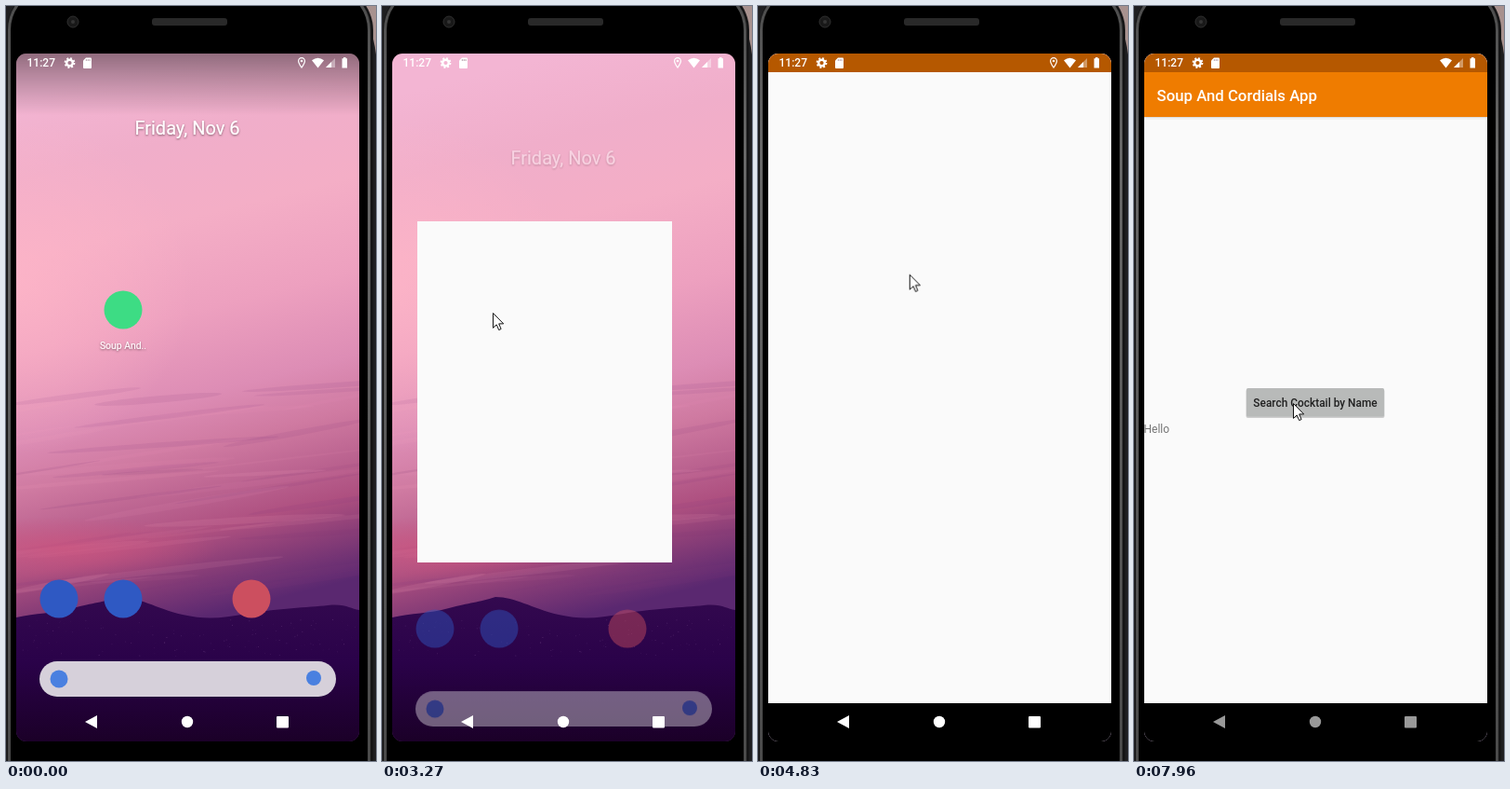
An HTML page that plays this animation: 398 px wide and 810 px high, repeating every 8 s.

```html
<!DOCTYPE html>
<html lang="en">
<head>
<meta charset="utf-8">
<title>Phone app launch</title>
<style>
html, body { margin: 0; width: 100%; height: 100%; overflow: hidden; background: #000; }
svg { position: absolute; left: 0; top: 0; display: block; }
#screen { position: absolute; left: 11px; top: 51px; width: 369px; height: 738px; border-radius: 11px; overflow: hidden; }
#screen > svg { left: -11px; top: -51px; }
text { font-family: Roboto, "Open Sans", sans-serif; }
.medium { font-weight: 500; }

.scrim, #home, #icon, #win, .bars, #app, .pin, #nav, #press, #cursor { animation: 8s linear infinite; }
.scrim { animation-name: scrim; }
#home { animation-name: home; }
#icon { animation-name: icon; transform-origin: 126px 326px; }
#win { position: absolute; background: #fafafa; animation-name: win; }
.bars { animation-name: bars; }
#app { animation-name: app; }
.pin { animation-name: pin; }
#nav { animation-name: nav; }
#press { animation-name: press; }
#cursor { animation-name: cursor; }

@keyframes scrim { 0%, 39% { opacity: 1; } 40.8%, 100% { opacity: 0; } }
@keyframes home {
  0%, 39% { opacity: 1; transform: none; }
  40.875% { opacity: .46; transform: translateY(32px); }
  42.5%, 100% { opacity: 0; transform: translateY(46px); }
}
@keyframes icon {
  0%, 32.25% { transform: scale(1); }
  35%, 39% { transform: scale(1.12); opacity: 1; }
  39.8%, 100% { transform: scale(1.12); opacity: 0; }
}
@keyframes win {
  0%, 39% { left: 95px; top: 255px; width: 40px; height: 40px; opacity: 0; }
  40% { left: 53px; top: 269px; width: 186px; height: 151px; opacity: 1; }
  40.875% { left: 27px; top: 181px; width: 273px; height: 364px; }
  41.875% { left: 9px; top: 72px; width: 337px; height: 592px; }
  43.75%, 100% { left: 0; top: 0; width: 369px; height: 738px; opacity: 1; }
}
@keyframes bars { 0%, 42.8% { opacity: 0; } 45%, 100% { opacity: 1; } }
@keyframes app { 0%, 63.8% { opacity: 0; } 66%, 100% { opacity: 1; } }
@keyframes pin { 0%, 63.8% { opacity: 1; } 66%, 100% { opacity: 0; } }
@keyframes nav { 0%, 61.25% { fill: #fff; } 66%, 100% { fill: #999; } }
@keyframes press { 0%, 97.2% { fill: #d6d7d6; } 99.5%, 100% { fill: #b8bab9; } }
@keyframes cursor {
  0%, 2.7% { transform: translate(360px, 815px); }
  2.875% { transform: translate(356px, 800px); animation-timing-function: ease-in-out; }
  12.75%, 13.125% { transform: translate(190px, 531px); animation-timing-function: ease-out; }
  17.625% { transform: translate(133px, 422px); animation-timing-function: ease-out; }
  23%, 23.625% { transform: translate(120px, 375px); animation-timing-function: ease-out; }
  30.375%, 53.375% { transform: translate(119px, 329px); animation-timing-function: ease-in-out; }
  63.25%, 69.5% { transform: translate(172px, 279px); animation-timing-function: ease-in-out; }
  79.375%, 80% { transform: translate(57.5px, 435.5px); animation-timing-function: ease-in-out; }
  85.125%, 100% { transform: translate(171px, 426px); }
}
</style>
</head>
<body>

<!-- phone body -->
<svg width="398" height="810">
  <defs>
    <linearGradient id="metal" x2="0" y2="1">
      <stop stop-color="#4a4a4a"/><stop offset=".2" stop-color="#686868"/>
      <stop offset="1" stop-color="#474747"/>
    </linearGradient>
  </defs>
  <rect width="398" height="810" fill="#1f1f21"/>
  <path d="M376 0H398V52Q394 18 376 0Z" fill="#a8928f"/>
  <rect x="1" y="-22" width="394" height="900" rx="48" fill="#161617"/>
  <rect x="3.5" y="-20" width="387" height="900" rx="46" fill="#000" stroke="url(#metal)" stroke-width="3"/>
  <rect x="157" y="13" width="81" height="8" rx="3" fill="#292929"/>
  <circle cx="72" cy="17" r="6" fill="#191919" stroke="#303030"/>
  <circle cx="72" cy="17" r="2" fill="#353535"/>
</svg>

<div id="screen">
  <!-- home screen -->
  <svg width="398" height="810">
    <defs>
      <linearGradient id="sky" gradientUnits="userSpaceOnUse" x1="195" y1="51" x2="338" y2="624">
        <stop stop-color="#f3b5d3"/>
        <stop offset=".146" stop-color="#f0aeca"/>
        <stop offset=".29" stop-color="#f4aec6"/>
        <stop offset=".458" stop-color="#eda0bf"/>
        <stop offset=".606" stop-color="#dd8db5"/>
        <stop offset=".7" stop-color="#cf7aa1"/>
        <stop offset=".787" stop-color="#ba628f"/>
        <stop offset=".85" stop-color="#ae5080"/>
        <stop offset=".91" stop-color="#8c3f78"/>
        <stop offset="1" stop-color="#5a2870"/>
      </linearGradient>
      <radialGradient id="glow">
        <stop stop-color="#ffb6c8" stop-opacity=".75"/><stop offset="1" stop-color="#ffb6c8" stop-opacity="0"/>
      </radialGradient>
      <radialGradient id="rose">
        <stop stop-color="#cc557f" stop-opacity=".8"/><stop offset="1" stop-color="#cc557f" stop-opacity="0"/>
      </radialGradient>
      <linearGradient id="hill" x2="0" y2="1">
        <stop stop-color="#33094f"/><stop offset=".45" stop-color="#2a0249"/><stop offset="1" stop-color="#1b0028"/>
      </linearGradient>
      <linearGradient id="shade" x2="0" y2="1">
        <stop stop-opacity=".4"/><stop offset=".35" stop-opacity=".25"/><stop offset="1" stop-opacity="0"/>
      </linearGradient>
      <filter id="drop" x="-20%" y="-50%" width="140%" height="220%">
        <feDropShadow dx="0" dy="1" stdDeviation="1.2" flood-opacity=".5"/>
      </filter>
    </defs>
    <rect x="11" y="51" width="369" height="738" fill="url(#sky)"/>
    <ellipse cx="11" cy="300" rx="190" ry="180" fill="url(#glow)"/>
    <g id="streaks"></g>
    <ellipse cx="60" cy="582" rx="170" ry="34" fill="url(#rose)"/>
    <path fill="url(#hill)" d="M11 656C32 651 50 652 72 646S104 640 122 634C144 634 160 646 190 653S240 655 265 651S325 645 346 643S370 647 380 648V789H11Z"/>
    <g id="specks" fill="#8b5c9c"></g>
    <rect class="scrim" x="11" y="51" width="369" height="66" fill="url(#shade)"/>

    <g id="home">
      <text x="195" y="138" font-size="20" text-anchor="middle" fill="#fff" filter="url(#drop)">Friday, Nov 6</text>
      <circle id="icon" cx="126" cy="326" r="20.5" fill="#3ddc84"/>
      <text x="126" y="368" font-size="10.4" text-anchor="middle" fill="#fff" filter="url(#drop)">Soup And..</text>
      <circle cx="57" cy="636" r="20.5" fill="#2f59c3"/>
      <circle cx="126" cy="636" r="20.5" fill="#2f59c3"/>
      <circle cx="264" cy="636" r="20.5" fill="#cc4f5f"/>
      <rect x="36" y="703" width="319" height="38" rx="19" fill="#d6d0da"/>
      <circle cx="57" cy="722" r="9.5" fill="#4a80e0"/>
      <circle cx="331" cy="721" r="8" fill="#4a80e0"/>
    </g>
  </svg>

  <div id="win"></div>

  <!-- app -->
  <svg width="398" height="810">
    <g class="bars">
      <rect x="11" y="51" width="369" height="20" fill="#b55800"/>
      <rect x="11" y="748" width="369" height="41"/>
    </g>
    <g id="app">
      <rect x="11" y="119" width="369" height="1" fill="#dcdcdc"/>
      <rect x="11" y="120" width="369" height="2" fill="#f1f1f1"/>
      <rect x="11" y="71" width="369" height="48" fill="#ef7c00"/>
      <text class="medium" x="24.5" y="102" font-size="16.8" fill="#fff">Soup And Cordials App</text>
      <rect x="120.5" y="411" width="149" height="31" rx="2" fill="#000" opacity=".18"/>
      <rect id="press" x="121" y="410" width="148" height="30.5" rx="1.5"/>
      <text class="medium" x="195" y="430" font-size="11.9" text-anchor="middle" fill="#202020">Search Cocktail by Name</text>
      <text x="10.5" y="458" font-size="12" fill="#757575">Hello</text>
    </g>

    <!-- status bar -->
    <g fill="#fff">
      <text class="medium" x="22.5" y="65.3" font-size="12">11:27</text>
      <g fill="none" stroke="#fff">
        <circle cx="68.5" cy="61" r="3.3" stroke-width="2.4"/>
        <circle cx="68.5" cy="61" r="4.9" stroke-width="2" stroke-dasharray="1.9 1.95"/>
      </g>
      <path d="M86 55.5H91Q92 55.5 92 56.5V66Q92 67 91 67H84Q83 67 83 66V58.5Z"/>
      <path d="M86.3 57V59M88.2 57V59M90.1 57V59" stroke="#a58a96" stroke-width=".8"/>
      <path class="pin" fill-rule="evenodd" d="M318 55C315.600 55 314 56.800 314 59C314 62 318 67 318 67S322 62 322 59C322 56.800 320.400 55 318 55ZM318 56.200A2.800 2.800 0 0 1 320.800 59C320.800 61 318 65 318 65S315.200 61 315.200 59A2.800 2.800 0 0 1 318 56.200Z"/>
      <circle class="pin" cx="318" cy="59" r="1.3"/>
      <path d="M329 58.200Q335.500 53.200 342 58.200L335.500 66.500Z"/>
      <path d="M354 56V66H344Z" opacity=".4"/>
      <path d="M350 60V66H344Z"/>
      <path d="M363 55H365.500V56.300H367V66.500H361.500V56.300H363Z"/>
    </g>

    <g id="nav">
      <path d="M85 768L98 761V775Z"/>
      <circle cx="195" cy="768" r="6.2"/>
      <rect x="291" y="762" width="13" height="12.5" rx="1"/>
    </g>
  </svg>
</div>

<svg width="398" height="810">
  <path id="cursor" d="M.5 .5V16.400L4.200 12.900L6.700 18.600L9.100 17.500L6.700 11.900H11.700Z" fill="#fff" stroke="#111" stroke-width="1"/>
</svg>

<script>
// Seeded texture for the sky and the hills
let seed = 7;
const rnd = (a, b) => {
  seed = (seed * 16807) % 2147483647;
  return a + (b - a) * seed / 2147483647;
};
const add = (id, tag, attrs) => {
  const el = document.createElementNS("http://www.w3.org/2000/svg", tag);
  for (const k in attrs) el.setAttribute(k, attrs[k]);
  document.getElementById(id).append(el);
};

for (let i = 0; i < 46; i++) {
  const x = rnd(11, 380), y = rnd(400, 640);
  add("streaks", "ellipse", {
    cx: x, cy: y, rx: rnd(50, 130), ry: rnd(1, 4),
    fill: i % 2 ? "#f3a0bd" : "#7c3577",
    opacity: rnd(.04, .13),
    transform: `rotate(${rnd(-11, -3)} ${x} ${y})`
  });
}
for (let i = 0; i < 150; i++) {
  add("specks", "circle", {
    cx: rnd(13, 378), cy: rnd(658, 698), r: rnd(.3, .6), opacity: rnd(.1, .4)
  });
}
</script>
</body>
</html>
```
